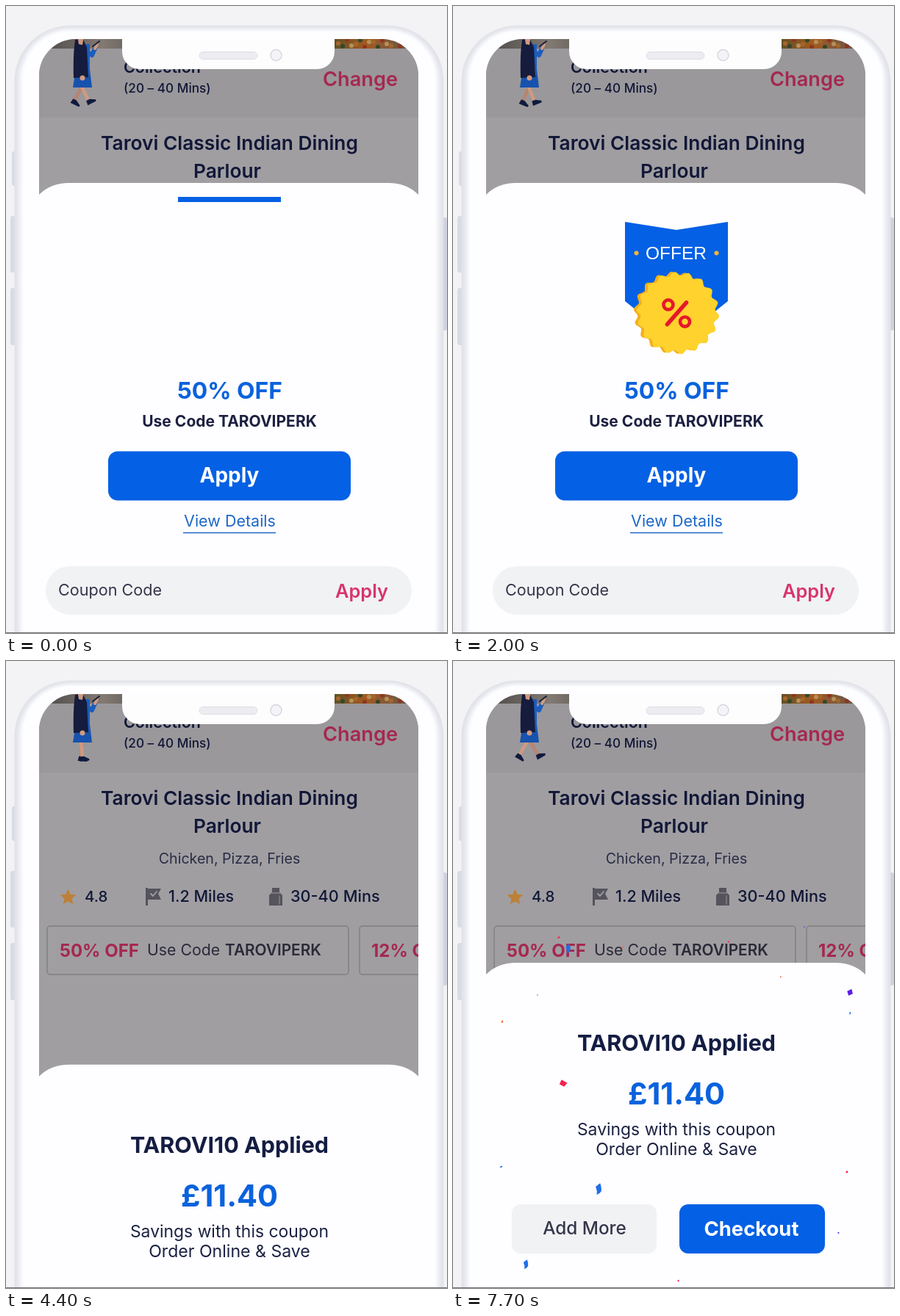
An HTML page with a canvas that plays this animation: 600 by 854 pixels, repeating every 7800 ms.

```html
<!DOCTYPE html>
<html lang="en">
<head>
<meta charset="utf-8">
<title>Coupon applied</title>
<style>
html, body { margin: 0; width: 100%; height: 100%; overflow: hidden; background: #f3f2f5; }
canvas { display: block; }
</style>
</head>
<body>
<canvas id="stage" width="600" height="854"></canvas>
<script>
const c = document.getElementById('stage').getContext('2d');
const LOOP = 7800, TAU = Math.PI * 2;
const BLUE = '#0460e4', NAVY = '#111737', PINK = '#a5284f', PALE = '#f0f2f4', WHITE = '#fefdff';

const clamp = v => Math.max(0, Math.min(1, v));
const span = (t, from, to) => clamp((t - from) / (to - from));
const easeOut = p => 1 - (1 - p) ** 3;
const easeIn = p => p * p;
const easeInOut = p => p * p * (3 - 2 * p);

function box(x, y, w, h, r, fill, stroke, width = 1) {
  c.beginPath();
  c.roundRect(x, y, w, h, r);
  if (fill) { c.fillStyle = fill; c.fill(); }
  if (stroke) { c.strokeStyle = stroke; c.lineWidth = width; c.stroke(); }
}
function disc(x, y, r, fill) {
  c.beginPath();
  c.arc(x, y, r, 0, TAU);
  c.fillStyle = fill;
  c.fill();
}
function shape(d, fill) {
  c.fillStyle = fill;
  c.fill(new Path2D(d));
}
function line(d, color, width, cap = 'round') {
  c.strokeStyle = color;
  c.lineWidth = width;
  c.lineCap = cap;
  c.lineJoin = 'round';
  c.stroke(new Path2D(d));
}
function text(s, x, y, size, weight, color, align = 'left', family = 'Inter') {
  c.font = `${weight} ${size}px ${family}, sans-serif`;
  c.textAlign = align;
  c.fillStyle = color;
  c.fillText(s, x, y);
}
function at(x, y, draw, scale = 1, angle = 0) {
  c.save();
  c.translate(x, y);
  c.rotate(angle);
  c.scale(scale, scale);
  draw();
  c.restore();
}
function gradient(x0, x1, ...colors) {
  const g = c.createLinearGradient(x0, 0, x1, 0);
  colors.forEach((color, i) => g.addColorStop(i / (colors.length - 1), color));
  return g;
}

function phone() {
  c.fillStyle = '#f3f2f5';
  c.fillRect(0, 0, 600, 854);
  const side = '#d9dbe5';
  box(8, 198, 8, 47, 3, side);
  box(6, 286, 10, 77, 3, side);
  box(6, 384, 10, 78, 3, side);
  box(590, 288, 10, 154, 3, '#cfd2de');
  // soft rim, lighter towards the inside
  for (let i = 0; i <= 14; i++) {
    const v = 226 + 28 * easeInOut(i / 14);
    box(11.5 + i, 26.5 + i * .7, 584 - 2 * i, 900, 76 - i, `rgb(${v},${v + 1},${Math.min(255, v + 6)})`);
  }
  box(26, 37, 555, 900, 62, WHITE);
}

function notch() {
  box(158, 20, 289, 66, 24, '#fdfdfe');
  box(263, 62.5, 79, 10, 5, '#ececf1', '#dddde5');
  box(360, 59.5, 15, 15, 7.5, '#f4f4f8', '#d6d6df', 1.5);
}

function walker(t) {
  const swing = 0.55 * Math.cos(Math.PI * (t - 600) / 510);
  const leg = (x, angle, skin) => at(x, 108, () => {
    line('M0 0 L0 24', skin, 4.6);
    shape('M-3 22 L2 22 L9 26 Q10 28 8 28.5 L-4 28.5Z', '#111a3e');
  }, 1, angle);
  leg(104, -swing, '#b98470');
  leg(102, swing, '#cf9a80');
  shape('M95 86 L114 86 L117 111 L91 111Z', '#1752ae');
  shape('M97 52 L114 52 L114 94 L97 94Z', '#1b5dbd');
  line('M110 62 L117 67 L121 58', '#1b5dbd', 6);
  line('M121 58 L124 52', '#cf9a80', 4);
  line('M118 55 L127 48', '#1b2038', 2);
  shape('M94 46 L104 44 L110 56 L112 97 L92 98 Q91 66 94 46Z', '#151c3d');
  shape('M97 40 L106 40 L104 53 L99 52Z', '#cf9a80');
  disc(104, 98, 3.5, '#cf9a80');
}

function page(t) {
  c.fillStyle = '#a09ea1';
  c.fillRect(44, 45, 518, 809);
  c.fillStyle = gradient(60, 561, '#54504f', '#827a72', '#55504d', '#4b3a2c', '#8b4a1c', '#334a2b', '#a35a20', '#565757');
  c.fillRect(44, 45, 518, 13);
  for (let i = 0; i < 16; i++) {
    disc(452 + i * 6, 51 + 5 * Math.sin(i * 2.3), 3, ['#a5662a', '#32482c', '#8f3520', '#b79058'][i % 4]);
  }
  c.fillStyle = '#9a989b';
  c.fillRect(44, 58, 518, 94);
  walker(t);
  text('Collection', 160, 91, 21.5, 600, NAVY);
  text('(20 – 40 Mins)', 160, 117.5, 17.2, 500, NAVY);
  text('Change', 431, 109, 27.2, 600, PINK);
  text('Tarovi Classic Indian Dining', 304, 196, 26.3, 600, NAVY, 'center');
  text('Parlour', 301, 234, 26.3, 600, NAVY, 'center');
  text('Chicken, Pizza, Fries', 304, 276, 19.6, 400, '#292c45', 'center');

  let star = '';
  for (let i = 0; i < 10; i++) {
    const r = i % 2 ? 5.3 : 11.5, a = i * Math.PI / 5 - Math.PI / 2;
    star += (i ? 'L' : 'M') + (84.5 + r * Math.cos(a)) + ' ' + (322 + r * Math.sin(a));
  }
  shape(star + 'Z', '#bd8038');
  text('4.8', 107, 328, 20.5, 500, NAVY);
  shape('M190 309 H193 V333 H190Z M193 310 H211 L207 317 L211 325 H193Z', '#55535c');
  line('M197 317 L200 320 L205 314', '#a09ea1', 1.8);
  text('1.2 Miles', 221, 328, 21.5, 500, NAVY);
  shape('M362 309 H372 V315 L376 319 V333 H358 V319 L362 315Z', '#55535c');
  line('M361 316 H373 M372 320 V331', '#88868c', 1.3);
  text('30-40 Mins', 387, 328, 21.7, 500, NAVY);

  box(56, 361, 410, 66, 4, null, '#817f84', 1.5);
  box(481, 361, 410, 66, 4, null, '#817f84', 1.5);
  text('50% OFF', 73, 403, 24, 700, PINK);
  text('Use Code', 192, 401, 21.3, 400, '#2a2a3a');
  text('TAROVIPERK', 298, 401, 20.8, 600, '#2a2a3a');
  text('12% OFF', 497, 403, 24, 700, PINK);
}

const sheet = top => shape(`M40 ${top + 20} L44 ${top + 17} Q60 ${top} 86 ${top} H520 Q546 ${top} 562 ${top + 17} L566 ${top + 20} V1500 H40Z`, WHITE);

function ribbon(t) {
  const g = easeOut(span(t, 0, 560));
  const w = span(t, 150, 550) * Math.exp(-(t - 600) / 250) * Math.cos(TAU * (t - 600) / 500);
  const top = 260 + 34 * g, low = top + 7 + 101 * g, mid = (top + low) / 2;
  shape(`M234 ${top} L304 ${top + 11 * g} L374 ${top}
    Q${374 + 13 * w} ${mid} ${374 - 20 * w} ${low}
    L${304 - 49 * w} ${low + 56 * g - 14 * w} L${234 - 16 * w} ${low}
    Q${234 + 13 * w} ${mid} 234 ${top}Z`, BLUE);
}

function offer(t) {
  let x = 262;
  const slide = -18 * (1 - easeInOut(span(t, 600, 950)));
  [...'OFFER'].forEach((ch, i) => {
    c.font = '24.5px "Liberation Sans", Arial, sans-serif';
    const width = c.measureText(ch).width, p = span(t, 450 + 100 * i, 850 + 100 * i);
    const size = 1 - (1 - p) ** 2;
    if (size) at(x + width / 2 + slide, 336 + slide * -.15, () =>
      text(ch, 0, 9, 24.5, 400, '#fff', 'center', '"Liberation Sans", Arial'), size);
    x += width;
  });
  const dot = easeOut(span(t, 900, 1200));
  disc(249.5, 336.5, 3 * dot, '#f6b72c');
  disc(358.5, 336.5, 3 * dot, '#f6b72c');
}

function seal(x, y, angle, fill) {
  c.beginPath();
  for (let i = 0; i < 180; i++) {
    const a = i / 180 * TAU, r = 53.3 + 2.7 * Math.cos(18 * a);
    c.lineTo(x + r * Math.cos(a + angle), y + r * Math.sin(a + angle));
  }
  c.fillStyle = fill;
  c.fill();
}

function badge(t) {
  const p = span(t, 300, 1200);
  const size = p ? 1 - Math.exp(-5.2 * p) * Math.cos(p * 2.4) : 0;
  if (!size) return;
  const turn = (185 + 0.072 * (t - 2000)) * Math.PI / 180;
  const dx = 2 * Math.cos(turn), dy = 2 * Math.sin(turn);
  at(304, 418, () => {
    seal(dx, dy, turn, '#f4ae1c');
    seal(-dx, -dy, turn, '#ffd22d');
    const mark = easeOut(span(t, 700, 1050));
    if (mark) at(0, 0, () => {
      line('M-12.5 15.5 L13.5 -14', '#e5182b', 5.5);
      line('M-17.5 -11 a6.5 6.5 0 1 0 13 0 a6.5 6.5 0 1 0 -13 0Z M5 12 a6.5 6.5 0 1 0 13 0 a6.5 6.5 0 1 0 -13 0Z', '#e5182b', 4.6);
    }, mark);
  }, size);
}

function couponSheet(t) {
  sheet(241);
  ribbon(t);
  offer(t);
  badge(t);
  text('50% OFF', 304.5, 535, 31.8, 700, '#0a62dd', 'center');
  text('Use Code TAROVIPERK', 304, 573, 21, 700, '#1c2040', 'center');
  box(139, 606.5, 330, 67, 13, BLUE);
  text('Apply', 304, 649, 28, 700, '#fff', 'center');
  text('View Details', 304.5, 709, 21.5, 400, '#1c68c6', 'center');
  line('M241 717.5 H367', '#1c68c6', 1.5, 'butt');
  box(54, 763, 498, 66, 33, PALE);
  text('Coupon Code', 71, 803, 21.6, 400, '#35354a');
  text('Apply', 520, 806, 25.4, 600, '#d8346c', 'right');
}

function touch(t) {
  const p = easeOut(span(t, 3300, 3800));
  const alpha = span(t, 3300, 3500) * (1 - span(t, 4050, 4250));
  if (!alpha) return;
  c.save();
  c.globalAlpha = alpha;
  const x = 540 - 213 * p, y = 745 - 104 * p;
  c.shadowColor = 'rgba(0,20,70,.4)';
  c.shadowBlur = 8;
  c.shadowOffsetY = 3;
  disc(x, y, 30.5, 'rgba(185,213,245,.62)');
  c.restore();
}

const COLORS = { r: '#f4234f', o: '#f4581c', b: '#1f6fe8', p: '#5a1ee6' };
const FORMS = {
  r: 'M-11 -7 L11 -9 L9 7 L-8 9Z',
  o: 'M-9 -9 Q-3 -11 3 -13 Q4 0 9 8 L-1 13 Q-7 3 -9 -9Z',
  b: 'M-3 -9 L11 -10 Q8 2 2 8 Q-4 11 -12 9 Q-5 2 -3 -9Z',
  p: 'M-1 -10 L9 -1 L2 10 L-8 2Z'
};
// kind, offset from the burst centre, size; a trailing 1 marks slower pieces, 2 late ones
const PIECES = [
  ['r', -113, -169, 1], ['o', -53, -160, .7], ['r', 46, -165, .8], ['p', 117, -179, .75],
  ['b', -84, -128, .65, 1], ['o', 95, -132, .7], ['p', -133, -115, .6], ['o', -166, -90, 1.05],
  ['b', 160, -98, 1], ['p', 129, -95, .7, 1], ['p', -76, -73, .55], ['b', -167, 46, 1],
  ['r', 157, 51, 1], ['r', 93, 93, .65, 1], ['p', 149, 108, .95], ['o', -141, 108, .7],
  ['b', -116, 111, .65, 1], ['o', 47, 122, .7], ['r', -1, 153, .8],
  ['r', -88, -26, .6, 2], ['b', -61, 54, .8, 2]
];

function confetti(t) {
  for (const start of [4750, 6500]) {
    const age = (t - start) / 1000;
    if (age <= 0 || age > 1.65) continue;
    PIECES.forEach(([kind, dx, dy, size, slow], i) => {
      const spread = slow ? 2.3 * (1 - Math.exp(-1.27 * age)) : 1.55 * (1 - Math.exp(-2.3 * age));
      const grow = slow === 2 ? span(age, .5, .9) : Math.min(1, .27 + 1.62 * age);
      const fade = slow ? 1 - span(age, 1, 1.65) : 1 - span(age, .6, 1.3);
      const scale = size * grow * fade;
      if (scale > 0) at(308 + dx * spread, 622 + dy * spread,
        () => shape(FORMS[kind], COLORS[kind]), scale, (age - .45) * (i % 2 ? .8 : -.8));
    });
  }
}

function appliedSheet(t) {
  const drop = 450 * (1 - easeOut(span(t, 4280, 4650)));
  c.save();
  c.translate(0, drop);
  sheet(411);
  confetti(t);
  text('TAROVI10 Applied', 304, 531, 30.5, 700, '#141d42', 'center');
  text('£11.40', 304, 604, 41.5, 700, '#0a62dd', 'center');
  text('Savings with this coupon', 304, 646, 22.9, 400, '#1b2142', 'center');
  text('Order Online & Save', 304, 673, 23.1, 400, '#1b2142', 'center');
  box(80, 740, 197, 67, 12, PALE);
  text('Add More', 179, 780.5, 24.3, 500, '#35354a', 'center');
  box(308, 740, 198, 67, 12, BLUE);
  text('Checkout', 406, 783, 27.4, 700, '#fff', 'center');
  c.restore();
}

function draw(t) {
  phone();
  c.save();
  c.beginPath();
  c.roundRect(45, 45, 516, 900, 50);
  c.clip();
  page(t);
  if (t < 4450) {
    at(0, 620 * easeIn(span(t, 4150, 4450)), () => couponSheet(t));
    touch(t);
  }
  if (t >= 4280) appliedSheet(t);
  notch();
  c.restore();
  c.fillStyle = '#77767a';
  c.fillRect(0, 853, 600, 1);
}

function tick() {
  // the motion advances in steps of 100 ms
  draw(Math.floor(performance.now() % LOOP / 100 + .05) * 100 % LOOP);
  requestAnimationFrame(tick);
}
tick();
</script>
</body>
</html>
```
